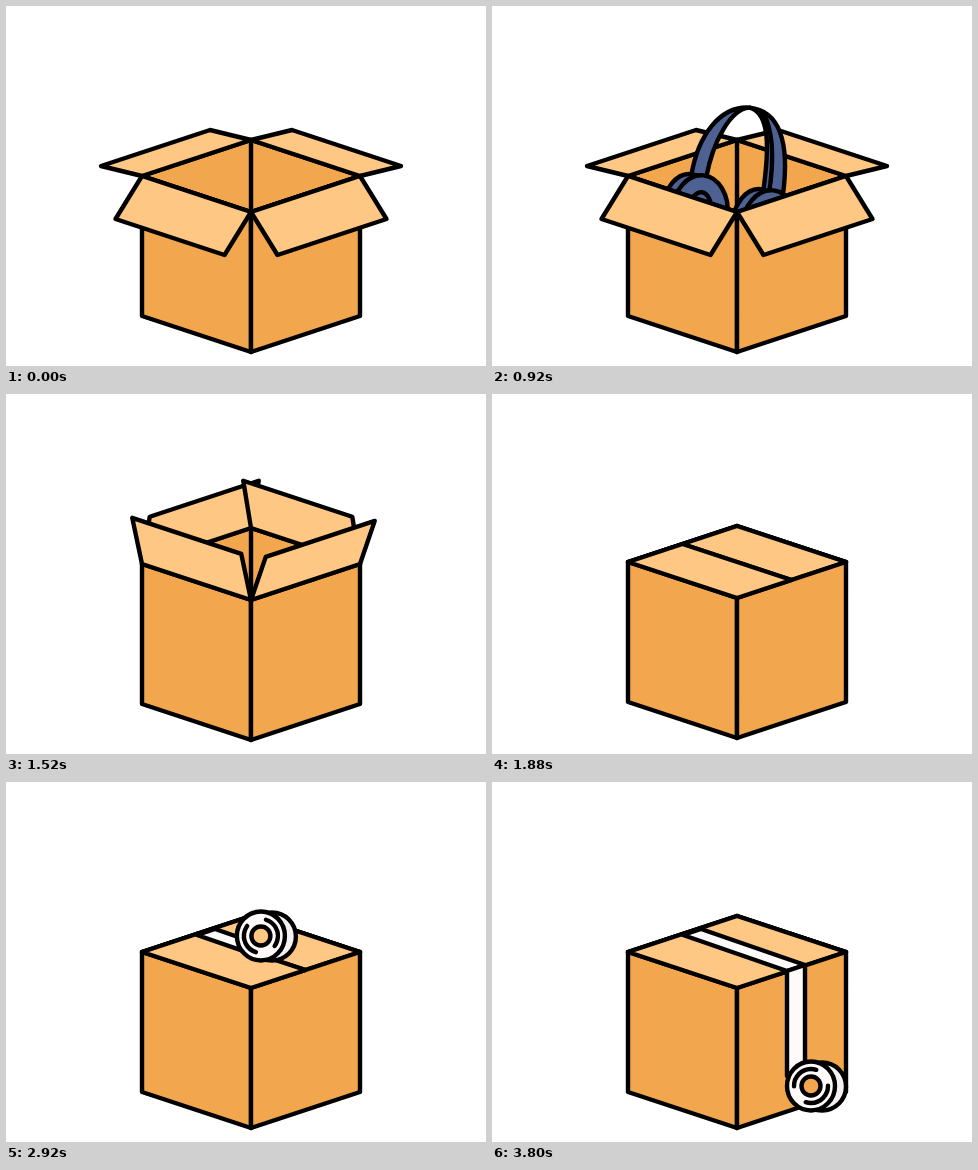
An HTML page with a canvas for the animation above (3.84 s loop, 480 by 360 pixels).

```html
<!DOCTYPE html>
<html lang="en">
<head>
<meta charset="utf-8">
<title>Packing a box</title>
<style>
html, body { margin: 0; width: 100%; height: 100%; overflow: hidden; background: #fff; }
canvas { display: block; }
</style>
</head>
<body>
<canvas id="stage" width="480" height="360"></canvas>
<script>
const ctx = document.getElementById('stage').getContext('2d');
const LOOP = 3840, TAU = Math.PI * 2;
const FACE = '#f2a64d', LIGHT = '#ffc784', BLUE = '#4e6193', TAPE = '#fffafa';

// Box corners; the bottom lies DEPTH below the rim.
const B = [245, 134], L = [136, 170], R = [354, 170], F = [245, 206], DEPTH = 140;
const add = (p, q) => [p[0] + q[0], p[1] + q[1]];
const mirror = ([x, y]) => [-x, y];
const down = p => add(p, [0, DEPTH]);

// Flap edge offsets from the hinge: time, x, y.
const BACK_FLAP = [[1000, -41, -10], [1240, -37, -17.5], [1360, -28, -36], [1490, 0, -54],
  [1610, 30, -28], [1760, 54.5, 18]];
const FRONT_FLAP = [[1000, -26.5, 43], [1240, -35.5, 18.5], [1350, -39, -5], [1460, -25, -37],
  [1560, 0, -52], [1690, 30, -40], [1840, 54.5, -18]];
const RIGHT_DELAY = 20;
// Headphones: time, x shift, y shift, tilt.
const DROP = [[230, 0, -170, 0], [640, 0, 0, 0], [760, 4, 48, 1], [1000, 18, 113, 8],
  [1240, 33, 146, 13], [1440, 36, 215, 15]];
// Tape roll centre: time, x, y.
const ROLL = [[2520, 190, 126], [3280, 313, 179], [3800, 319, 304]];

function track(keys, t) {
  if (t <= keys[0][0]) return keys[0].slice(1);
  const i = keys.findIndex(k => k[0] > t);
  if (i < 0) return keys[keys.length - 1].slice(1);
  const a = keys[i - 1], b = keys[i], u = (t - a[0]) / (b[0] - a[0]);
  return a.slice(1).map((v, n) => v + (b[n + 1] - v) * u);
}

function paint(fill) {
  if (fill) { ctx.fillStyle = fill; ctx.fill(); }
  ctx.stroke();
}

function poly(points, fill) {
  ctx.beginPath();
  points.forEach(p => ctx.lineTo(p[0], p[1]));
  if (fill) ctx.closePath();
  paint(fill);
}

function oval(x, y, rx, ry, fill, from = 0, to = TAU) {
  ctx.beginPath();
  ctx.ellipse(x, y, rx, ry, 0, from, to);
  paint(fill);
}

function shape(d, fill) {
  const path = new Path2D(d);
  if (fill) { ctx.fillStyle = fill; ctx.fill(path); }
  ctx.stroke(path);
}

function headphones(t) {
  const [x, y, tilt] = track(DROP, t);
  ctx.save();
  ctx.translate(244 + x, 10 + y);
  ctx.rotate(tilt * Math.PI / 180);
  ctx.translate(-244, -10);
  if (t < 760) {
    ctx.fillStyle = '#ffe8e5';
    ctx.fill(new Path2D('M215 56C222 62 218 80 228 88Q234 96 234 112L208 86Z'));
  }
  shape('M193 82C196 42 215 11 244 10C226 13 211 46 208 84Z', BLUE);
  shape('M244 10C273 10 288 38 286 94L266 94C268 48 265 13 244 10Z', BLUE);
  shape('M258 14C270 30 274 57 272 94');
  oval(192, 120, 25, 38, BLUE);
  oval(205, 120, 28, 38, BLUE);
  oval(205, 121, 12, 22, BLUE);
  oval(263, 128, 25, 38, BLUE);
  oval(276, 128, 28, 38, BLUE);
  oval(278, 129, 20, 28, null, 1.3, 5);
  ctx.restore();
}

function box(t) {
  const flap = (p, q, offset) => poly([p, q, add(q, offset), add(p, offset)], LIGHT);
  const frontRight = () => flap(F, R, mirror(track(FRONT_FLAP, t - RIGHT_DELAY)));
  const closing = t > 1640;

  poly([L, B, R, F], FACE);
  poly([B, F]);
  flap(L, B, track(BACK_FLAP, t));
  if (closing) frontRight();
  flap(B, R, mirror(track(BACK_FLAP, t)));
  if (t > 230 && t < 1440) headphones(t);
  poly([L, F, down(F), down(L)], FACE);
  poly([F, R, down(R), down(F)], FACE);
  if (!closing) frontRight();
  flap(L, F, track(FRONT_FLAP, t));
}

function strip(t, [x, y]) {
  const start = [[191, 153], [209, 147]], end = [[295, 189], [313, 183]];
  const k = t > 3280 ? 1 : Math.max(0, (x - 190) / 123);
  const along = (a, b) => [a[0] + (b[0] - a[0]) * k, a[1] + (b[1] - a[1]) * k];
  // Stop short of the open core while the roll is still on the lid.
  if (k > 0) {
    ctx.save();
    if (k < 1) {
      ctx.beginPath();
      ctx.rect(0, 0, x - 10, 360);
      ctx.clip();
    }
    poly([start[0], start[1], along(start[1], end[1]), along(start[0], end[0])], TAPE);
    ctx.restore();
  }
  const bottom = y - 10;
  if (bottom > 189) poly([end[0], end[1], [313, bottom], [295, bottom]], TAPE);
}

function roll(t, [x, y]) {
  const grow = Math.min(1, (t - 2160) / 160);
  const travelled = t < 3280 ? Math.max(0, t - 2520) * 0.176 : 134 + (t - 3280) * 0.24;
  ctx.save();
  ctx.translate(x, y);
  ctx.scale(grow, grow);
  // The core is open, so the box shows through it.
  ctx.save();
  ctx.beginPath();
  ctx.rect(-40, -40, 90, 80);
  ctx.arc(0, 0, 9, 0, TAU);
  ctx.clip('evenodd');
  oval(11, 0.5, 24, 24, '#f5f1f1');
  oval(0, 0, 24, 24.5, TAPE);
  ctx.restore();
  oval(0, 0, 9.5, 9.5);
  ctx.rotate(travelled / 25);
  oval(0, 0, 17, 17, null, -0.95, 0.95);
  oval(0, 0, 17, 17, null, Math.PI - 0.95, Math.PI + 0.95);
  ctx.restore();
}

function draw(t) {
  ctx.fillStyle = '#fff';
  ctx.fillRect(0, 0, 480, 360);
  ctx.strokeStyle = '#000';
  ctx.lineWidth = 4.4;
  ctx.lineJoin = ctx.lineCap = 'round';
  const hop = t > 1760 && t < 2000 ? 2 * Math.sin((t - 1760) / 240 * Math.PI) : 0;
  ctx.save();
  ctx.translate(0, -hop);
  box(t);
  ctx.restore();
  if (t > 2160) {
    const centre = track(ROLL, t);
    strip(t, centre);
    roll(t, centre);
  }
}

function tick() {
  draw(performance.now() % LOOP);
  requestAnimationFrame(tick);
}
tick();
</script>
</body>
</html>
```
